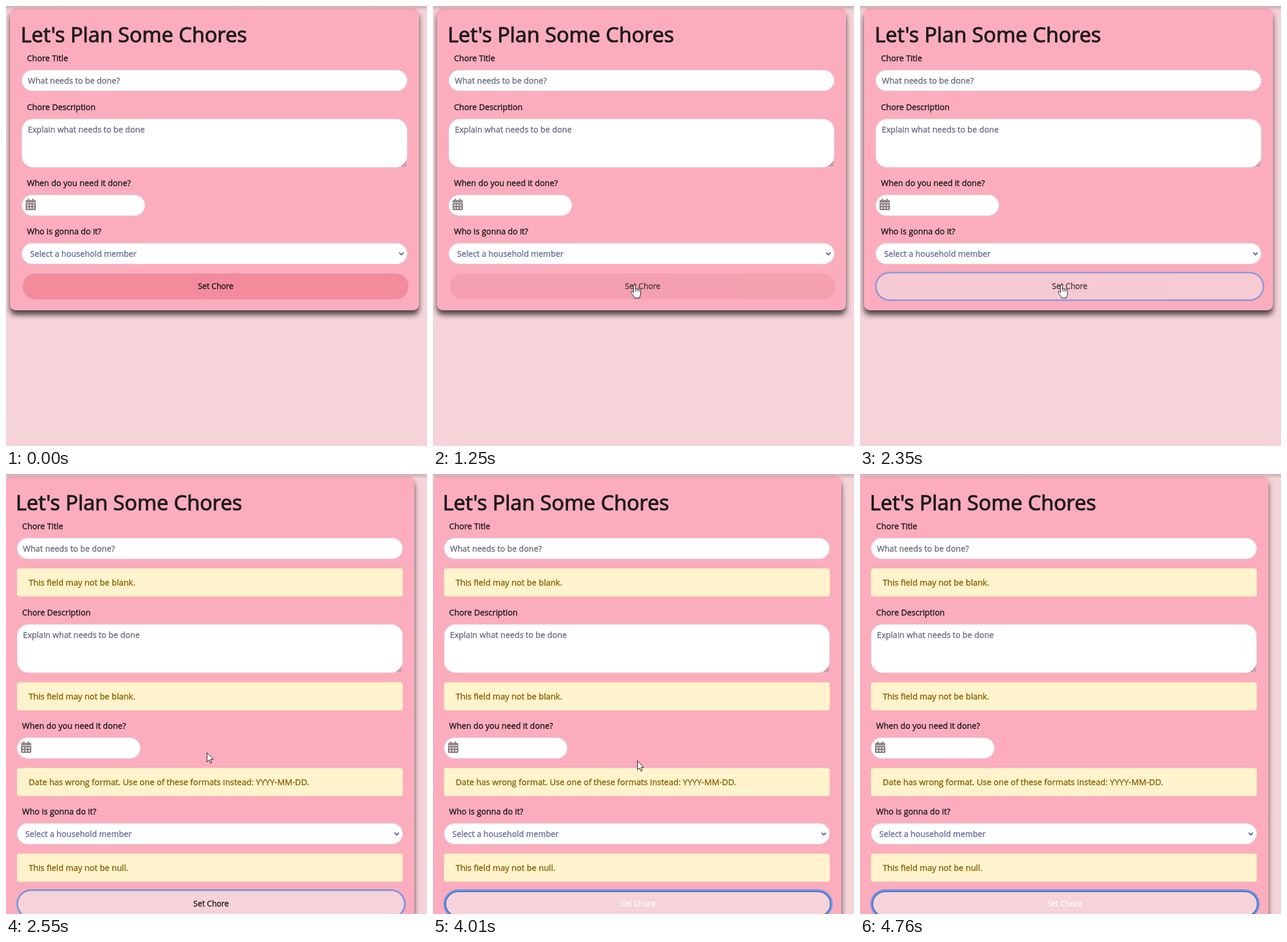
Write an HTML page that moves like this. It is 732 px wide and 765 px high and loops after 5.49 s.

```html
<!DOCTYPE html>
<html lang="en">
<head>
<meta charset="utf-8">
<title>Chore planner</title>
<style>
  :root { --loop: 5490ms; --page: #f5d3d8; --ink: #1f1b1e; --ring: rgba(0, 123, 255, .5); }
  * { box-sizing: border-box; }
  html, body { margin: 0; width: 100%; height: 100%; overflow: hidden; background: var(--page); }
  body { position: relative; color: var(--ink); font: 400 14.2px/20px "Open Sans", sans-serif; -webkit-text-stroke: .4px; white-space: nowrap; }
  body::after { content: ""; position: absolute; inset: 0 0 auto; height: 8px; background: linear-gradient(rgba(0, 0, 0, .18), transparent); }

  .form { position: absolute; top: 0; left: 0; width: 732px; height: 765px; animation: shift var(--loop) step-end infinite; }
  .card { position: absolute; left: 7px; top: 4px; width: 711px; height: 525px; border-radius: 10px; background: #fbadbe; box-shadow: 0 8px 10px rgba(0, 0, 0, .68); animation: grow var(--loop) step-end infinite; }
  h1 { position: absolute; left: 25.5px; top: 25px; margin: 0; font-size: 36.3px; font-weight: 400; line-height: 48px; -webkit-text-stroke: 1.1px; }

  .row, .button { position: absolute; top: var(--y); width: 671.3px; animation: drop var(--loop) step-end infinite; }
  .row { left: 27px; }
  .label { position: absolute; left: 9.5px; top: -30px; }
  .control { position: relative; height: 37px; padding: 8px 10px; border: 1px solid #e0d8de; border-radius: 20px; background: #fff; color: #6b7082; }
  .area { height: 84.5px; }
  .date { width: 215px; height: 36.5px; }
  .select { padding-left: 14px; color: #6a6f99; }
  .control svg { position: absolute; overflow: visible; }
  .alert { height: 49px; margin-top: 16px; padding: 14px 20px; border: 1px solid #ffeeba; border-radius: 4px; background: #fff3cd; color: #856404; font-size: 14.5px; visibility: hidden; animation: reveal var(--loop) step-end infinite; }

  .button {
    left: 29px; height: 44.5px; border: 2px solid transparent; border-radius: 23px;
    background: #f38b9d border-box; font-size: 13.65px; line-height: 40px; text-align: center;
    animation: drop var(--loop) step-end infinite, fill var(--loop) step-end infinite, dim var(--loop) step-end infinite,
      focus var(--loop) step-end infinite, accent var(--loop) step-end infinite;
  }

  .pointer { position: absolute; left: 0; top: 0; overflow: visible; fill: #fff; stroke: #111; stroke-linejoin: round; visibility: hidden; }
  .arrow { animation: arrow var(--loop) step-end infinite; }
  .hand { animation: hand var(--loop) step-end infinite; }

  @keyframes shift { 0% { left: 0; } 46.448%, 100% { left: -8.5px; } }
  @keyframes grow { 0% { height: 525px; } 46.448%, 100% { height: 785px; } }
  @keyframes drop { 0% { margin-top: 0; } 46.448%, 100% { margin-top: calc(var(--n) * 65.1px); } }
  @keyframes reveal { 0% { visibility: hidden; } 46.448%, 100% { visibility: visible; } }

  @keyframes fill {
    0% { background-color: #f38b9d; }
    20.401% { background-color: #f38b9d; animation-timing-function: steps(4); }
    25.319%, 100% { background-color: var(--page); }
  }
  @keyframes dim {
    0%, 46.448%, 83.06%, 100% { opacity: 1; }
    20.401%, 78.142% { opacity: .78; }
  }
  @keyframes focus {
    0% { box-shadow: 0 0 0 0 transparent; }
    38.98% { box-shadow: 0 0 0 0 transparent; animation-timing-function: steps(3); }
    42.805%, 100% { box-shadow: 0 0 0 3px var(--ring); }
  }
  @keyframes accent {
    0% { color: var(--ink); border-color: transparent; }
    46.448% { color: var(--ink); border-color: transparent; animation-timing-function: steps(2); }
    48.998% { color: #fff; border-color: #4277cb; }
    78.142% { color: #fff; border-color: #4277cb; animation-timing-function: steps(3); }
    81.785% { color: var(--ink); border-color: transparent; }
    83.06% { color: var(--ink); border-color: transparent; animation-timing-function: steps(3); }
    86.703%, 100% { color: #fff; border-color: #4277cb; }
  }
  @keyframes arrow {
    0% { visibility: hidden; transform: translate(603px, 684px); }
    4.736% { visibility: visible; transform: translate(603px, 684px); }
    6.011% { visibility: visible; transform: translate(443px, 582px); }
    7.104% { visibility: visible; transform: translate(397px, 556px); }
    14.39% { visibility: visible; transform: translate(384px, 557px); }
    15.483% { visibility: visible; transform: translate(386px, 555px); }
    19.126% { visibility: visible; transform: translate(362px, 537px); }
    20.401% { visibility: hidden; transform: translate(349px, 484px); }
    46.448% { visibility: visible; transform: translate(349px, 484px); }
    73.042% { visibility: visible; transform: translate(355px, 498px); }
    74.317% { visibility: visible; transform: translate(400px, 524px); }
    75.592% { visibility: visible; transform: translate(505px, 588px); }
    76.867% { visibility: visible; transform: translate(590px, 665px); }
    78.142%, 100% { visibility: hidden; transform: translate(632px, 722px); }
  }
  @keyframes hand {
    0% { visibility: hidden; transform: translate(346px, 497px); }
    20.401% { visibility: visible; transform: translate(346px, 497px); }
    21.676% { visibility: visible; transform: translate(343px, 484px); }
    46.448% { visibility: hidden; transform: translate(343px, 484px); }
    78.142% { visibility: visible; transform: translate(632px, 724px); }
    79.235% { visibility: visible; transform: translate(650px, 750px); }
    80.51%, 100% { visibility: hidden; transform: translate(650px, 750px); }
  }
</style>
</head>
<body>
<div class="form">
  <div class="card"></div>
  <h1>Let's Plan Some Chores</h1>

  <div class="row" style="--y: 111px; --n: 0">
    <div class="label">Chore Title</div>
    <div class="control">What needs to be done?</div>
    <div class="alert">This field may not be blank.</div>
  </div>

  <div class="row" style="--y: 196px; --n: 1">
    <div class="label">Chore Description</div>
    <div class="control area">Explain what needs to be done
      <svg style="right: 1px; bottom: 1px" width="8" height="8" stroke="#555" fill="none"><path d="M0 8L8 0M4.5 8L8 4.5"/></svg>
    </div>
    <div class="alert">This field may not be blank.</div>
  </div>

  <div class="row" style="--y: 328px; --n: 2">
    <div class="label">When do you need it done?</div>
    <div class="control date">
      <svg style="left: 6px; top: 6px" width="18" height="20" fill="#8b7f80">
        <path d="M0 6.5V4.4Q0 2.5 1.9 2.5H3.8V.6Q3.8 0 4.4 0H5.7Q6.3 0 6.3 .6V2.5H11.7V.6Q11.7 0 12.3 0H13.6Q14.2 0 14.2 .6V2.5H16.1Q18 2.5 18 4.4V6.5Z"/>
        <path fill-rule="evenodd" d="M0 7.5H18V18.1Q18 20 16.1 20H1.9Q0 20 0 18.1ZM2.6 10v2.6h2.6V10zM7.7 10v2.6h2.6V10zM12.8 10v2.6h2.6V10zM2.6 15v2.6h2.6V15zM7.7 15v2.6h2.6V15zM12.8 15v2.6h2.6V15z"/>
      </svg>
    </div>
    <div class="alert">Date has wrong format. Use one of these formats instead: YYYY-MM-DD.</div>
  </div>

  <div class="row" style="--y: 412px; --n: 3">
    <div class="label">Who is gonna do it?</div>
    <div class="control select">Select a household member
      <svg style="right: 5px; top: 15px" width="9" height="6" stroke="#5b679a" stroke-width="2" fill="none"><path d="M.7 .7L4.5 4.5 8.3 .7"/></svg>
    </div>
    <div class="alert">This field may not be null.</div>
  </div>

  <div class="button" style="--y: 465px; --n: 4">Set Chore</div>
</div>

<svg class="pointer arrow" width="12" height="20"><path d="M.5 .5V16.5L4.2 13 6.6 18.8 8.9 17.8 6.5 12.1H11.5Z"/></svg>
<svg class="pointer hand" width="19" height="25">
  <path d="M5.5 14.5V2.3a1.7 1.7 0 0 1 3.4 0V8.2a1.6 1.6 0 0 1 3.1 .3a1.6 1.6 0 0 1 3 .6a1.5 1.5 0 0 1 2.8 1V17c0 2.4-1.6 3.6-1.6 6.8H7.4c0-2.6-3-4.8-5.7-9.4c-1.6-2.6 1.4-4 3.8 .1Z"/>
  <path fill="none" d="M8.9 8.2v4M12 8.5v4M15 9.1v3.4"/>
</svg>
</body>
</html>
```
